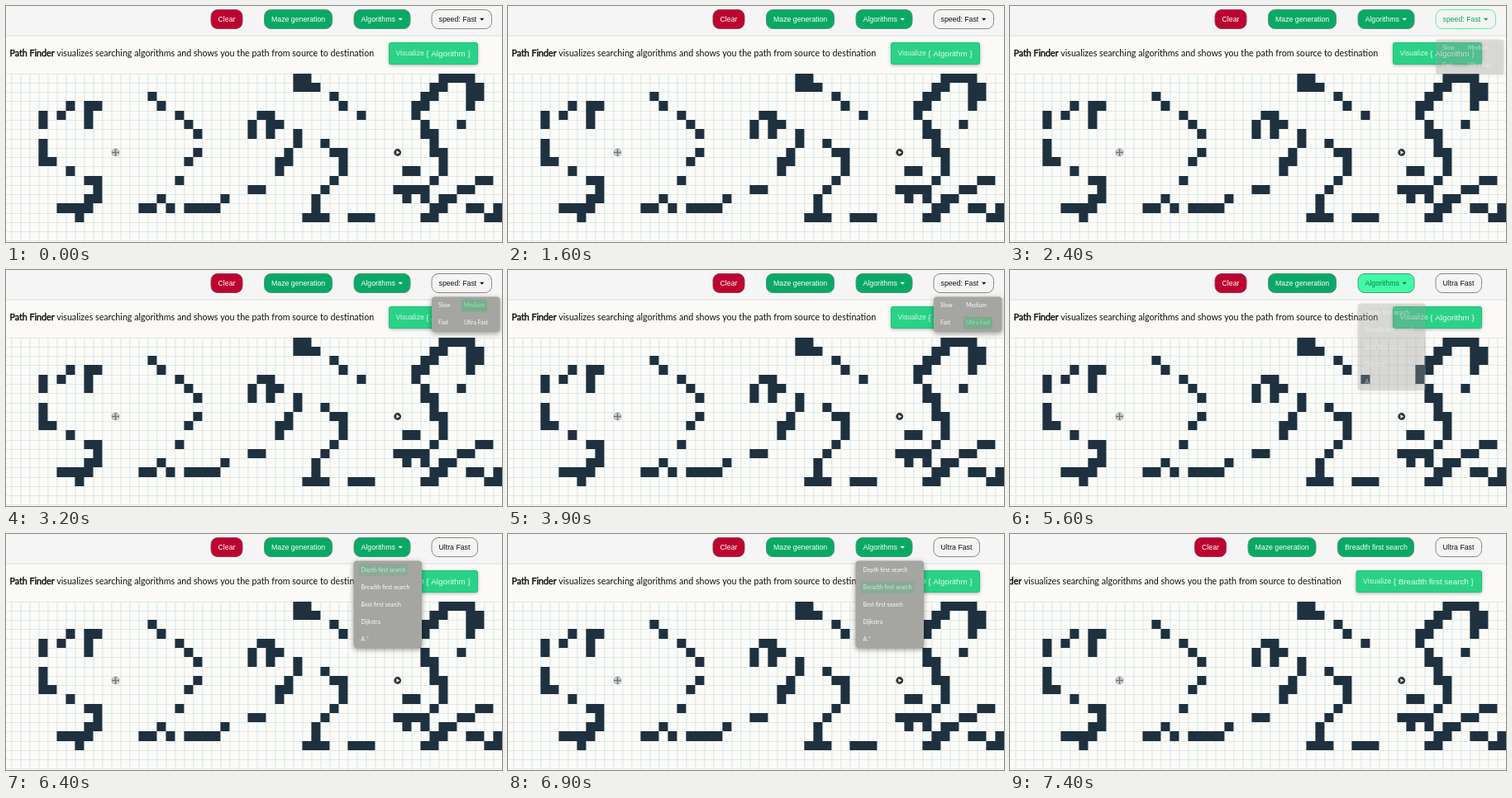
Animation of 600 by 286 pixels, one loop 8000 ms. Source, as an HTML page with a canvas:

```html
<!DOCTYPE html>
<html lang="en">
<head>
<meta charset="utf-8">
<title>Path Finder</title>
<style>
html, body { margin: 0; height: 100%; overflow: hidden; background: #fcfbf8; }
canvas { display: block; }
</style>
</head>
<body>
<canvas width="600" height="286"></canvas>
<script>
const ctx = document.querySelector('canvas').getContext('2d');
const SANS = '"Liberation Sans", Arial, sans-serif';
const LATO = 'Lato, sans-serif';
const LOOP = 8000;
const GREEN = [10, 168, 102], BRIGHT = [66, 249, 168], GREY = [135, 135, 135], INK = [20, 20, 20];
const GREEN_EDGE = '#4a9c7a';

// Wall columns for each grid row; "a-b" is a run
const WALLS = [
  '31-32 47-50',
  '31-33 46-47 50-51',
  '15 35 45-46 50-51',
  '6 8-9 16 36 44-45 50',
  '3 5 8 18 27-28 38 44',
  '3 8 19 26 28-29 45 49',
  '20 26 28 31 45-46',
  '3 31 34 46',
  '3 20 30 35-36 46-47',
  '3-4 19 29-30 36 47',
  '6 29 36 43-44 47',
  '8-9 18 35 46 51-52',
  '9 26-27 34 42-45 49-50',
  '8-9 16 23 33 43 45 47-48',
  '5-8 14-15 17 19-22 33 46-47 50-51 53',
  '7 32-34 37-39 45-46 52-53'
];
const SPEEDS = [['Slow', 523, 43], ['Medium', 554, 43], ['Fast', 523, 64], ['Ultra Fast', 554, 64]];
const SEARCHES = ['Depth first search', 'Breadth first search', 'Best first search', 'Dijkstra', 'A *']
  .map((name, i) => [name, 429.5, 43.5 + 21.1 * i]);

const ramp = (t, from, to) => Math.min(1, Math.max(0, (t - from) / (to - from)));
const pulse = (t, a, b, c, d) => ramp(t, a, b) - ramp(t, c, d);
const mix = (a, b, p) => `rgb(${a.map((v, i) => v + (b[i] - v) * p)})`;
const colX = c => 6.4 + 11 * c;
const rowY = r => Math.floor(82.2 + 11.26 * r);

function box(x, y, w, h, r, fill, stroke) {
  ctx.beginPath();
  ctx.roundRect(x, y, w, h, r);
  ctx.fillStyle = fill;
  ctx.fill();
  if (!stroke) return;
  ctx.shadowColor = 'transparent';
  ctx.strokeStyle = stroke;
  ctx.stroke();
}

function text(str, x, y, size, color, family = SANS) {
  ctx.font = `${size}px ${family}`;
  ctx.fillStyle = color;
  ctx.fillText(str, x, y);
}

function shadow(color, blur, y) {
  ctx.shadowColor = color;
  ctx.shadowBlur = blur;
  ctx.shadowOffsetY = y;
}

function disc(x, y, r) {
  ctx.beginPath();
  ctx.arc(x, y, r, 0, 7);
}

function triangle(...p) {
  ctx.beginPath();
  ctx.moveTo(p[0], p[1]);
  ctx.lineTo(p[2], p[3]);
  ctx.lineTo(p[4], p[5]);
  ctx.fill();
}

function button(label, x, w, fill, color, stroke, arrowX) {
  box(x + .5, 4.5, w - 1, 23, 8, fill, stroke);
  text(label, x + 9, 19.2, 8.75, color);
  if (arrowX) triangle(arrowX, 14.8, arrowX + 5.4, 14.8, arrowX + 2.7, 17.8);
}

function grid() {
  ctx.fillStyle = '#e5e9e1';
  for (let r = 0; r < 19; r++) ctx.fillRect(0, rowY(r), 600, 1);
  ctx.fillStyle = '#cfe8f1';
  for (let c = 0; c < 54; c++) ctx.fillRect(colX(c), 82, 1, 204);
  ctx.fillStyle = '#1f303e';
  WALLS.forEach((row, r) => row.split(' ').forEach(run => {
    const [a, b = a] = run.split('-').map(Number);
    ctx.fillRect(colX(a), rowY(r), 11 * (b - a + 1), rowY(r + 1) - rowY(r));
  }));
}

function markers() {
  ctx.strokeStyle = '#5a5a5a';
  ctx.lineWidth = .8;
  for (const r of [4.1, 2.2]) {
    disc(132.5, 177.5, r);
    ctx.stroke();
  }
  ctx.beginPath();
  ctx.moveTo(128.5, 177.5);
  ctx.lineTo(136.5, 177.5);
  ctx.moveTo(132.5, 173.5);
  ctx.lineTo(132.5, 181.5);
  ctx.stroke();
  ctx.lineWidth = 1;
  disc(473.7, 177.5, 4.4);
  ctx.fillStyle = '#333';
  ctx.fill();
  ctx.fillStyle = '#fff';
  triangle(472.4, 175.2, 472.4, 179.8, 476.2, 177.5);
}

function banner(chosen) {
  const shift = chosen ? -44.5 : 0;
  ctx.fillStyle = '#fbfaf7';
  ctx.fillRect(0, 36, 600, 46);
  text('Path Finder', 4.5 + shift, 60.5, 10.7, '#111', LATO);
  ctx.strokeStyle = '#111';
  ctx.lineWidth = .45;
  ctx.strokeText('Path Finder', 4.5 + shift, 60.5);
  ctx.lineWidth = 1;
  text('visualizes searching algorithms and shows you the path from source to destination',
    61.2 + shift, 60.5, 10.7, '#111', LATO);
  const x = 463 + shift;
  shadow('rgba(0,0,0,.35)', 4, 1);
  box(x + .5, 44.5, 570 - x, 26, 2, '#2ad288', '#25c17c');
  text('Visualize', x + 8.5, 60.2, 8.6, '#d6f7e6');
  text(`{ ${chosen ? 'Breadth first search' : 'Algorithm'} }`, x + 45.3, 60.5, 9.8, '#e6fbf0');
}

function header(t, chosen) {
  ctx.fillStyle = '#f6f5f5';
  ctx.fillRect(0, 0, 600, 36);
  ctx.fillStyle = '#dededc';
  ctx.fillRect(0, 35.5, 600, 1);
  const shift = chosen ? -24.5 : 0;
  button('Clear', 247.5 + shift, 39, '#bb0530', '#fff', '#a33d57');
  button('Maze generation', 312 + shift, 83, '#0aa866', '#fff', GREEN_EDGE);

  const hover = pulse(t, 4900, 5000, 6200, 6400);
  if (chosen) {
    button('Breadth first search', 396, 93, '#0aa866', '#fff', GREEN_EDGE);
  } else {
    const color = hover ? mix([22, 170, 106], [15, 122, 78], ramp(t, 5000, 5400)) : '#fff';
    button('Algorithms', 420.5, 69, mix(GREEN, BRIGHT, hover), color, GREEN_EDGE, 474.5);
  }

  const lit = pulse(t, 1800, 1900, 2800, 3100);
  const fast = t < 4200;
  button(fast ? 'speed: Fast' : 'Ultra Fast', 514.5, fast ? 73.5 : 56.5, '#f5f4f3',
    mix(INK, GREEN, lit), mix(GREY, BRIGHT, lit), fast && 573);
}

// hovers holds the highlight strength of each item
function menu(x, h, items, hovers, shown) {
  if (!shown) return;
  ctx.save();
  ctx.globalAlpha = shown;
  ctx.translate(0, 12 * (1 - shown));
  shadow(`rgba(0,0,0,${.4 * shown})`, 6, 2);
  box(x, 32.5, 82.5, h, 4, '#a5a5a2');
  shadow('transparent', 0, 0);
  ctx.globalAlpha = Math.sqrt(shown);
  items.forEach(([name, left, y], i) => {
    const p = hovers[i] || 0;
    ctx.font = `6.9px ${LATO}`;
    box(left - 3, y - 7.5, ctx.measureText(name).width + 6, 15, 2, `rgba(95,175,130,${.55 * p})`);
    text(name, left, y + 2.4, 6.9, mix([250, 250, 250], [115, 245, 170], p), LATO);
  });
  ctx.restore();
}

function draw(now) {
  const t = Math.floor(now % LOOP / 100) * 100;
  const chosen = t >= 7400;
  shadow('transparent', 0, 0);
  ctx.fillStyle = '#fcfbf8';
  ctx.fillRect(0, 0, 600, 286);
  grid();
  markers();
  banner(chosen);
  header(t, chosen);
  menu(515, 42.5, SPEEDS,
    [0, pulse(t, 2900, 3200, 3300, 3600), 0, pulse(t, 3300, 3700, 4200, 4500)],
    pulse(t, 2300, 2600, 4100, 4500));
  menu(420.5, 105.5, SEARCHES,
    [pulse(t, 6250, 6500, 6600, 6900), pulse(t, 6600, 7100, 7400, 7500)],
    chosen ? 0 : ramp(t, 5450, 5900));
  requestAnimationFrame(draw);
}
requestAnimationFrame(draw);
</script>
</body>
</html>
```
